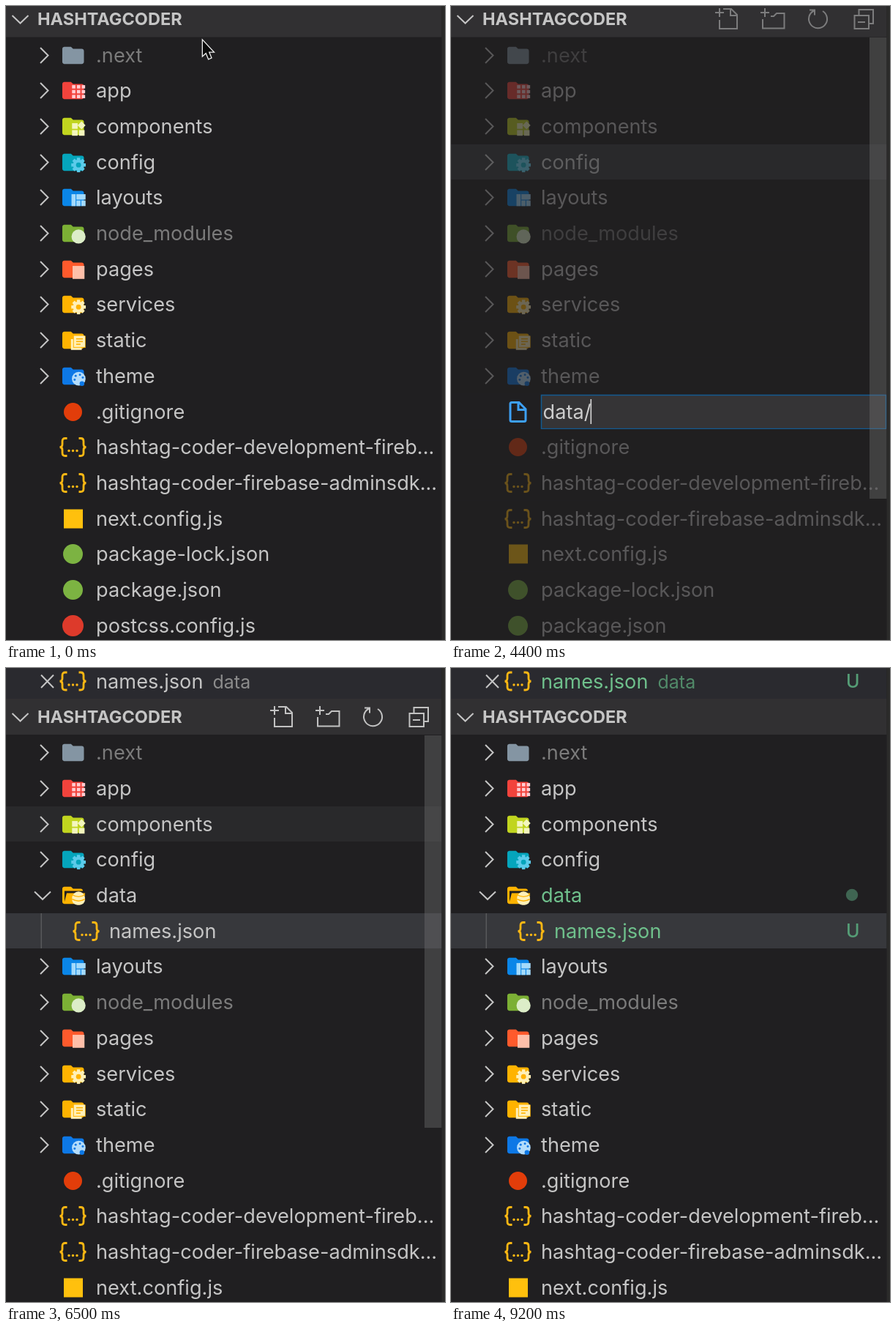
Recreate the animation shown at these times as an HTML page with a canvas. Size 600x866 px, loop 9300 ms.

```html
<!DOCTYPE html>
<html lang="en">
<head>
<meta charset="utf-8">
<title>File explorer</title>
<style>
  html, body { margin: 0; width: 100%; height: 100%; overflow: hidden; background: #201f21; }
  canvas { display: block; }
</style>
</head>
<body>
<canvas id="stage" width="600" height="866"></canvas>
<script>
const ctx = document.getElementById('stage').getContext('2d');
const LOOP = 9300, ROW = 48.7, SIDE = 595.5;
const ICONS_ON = 1100, EDIT = 1200, ENTER = 6100, CREATED = 6500, TRACKED = 7000, LEAVE = 8350;
const BACK = '#201f21', HOVER = '#29292b';
const TEXT = '#c5c5c5', MUTED = '#7b7b7b', GREEN = '#6fc08c', AMBER = '#ffb300';

const folder = (name, color, badge, tint, textColor) => ({ name, color, badge, tint, textColor, folder: true });
const file = (name, icon) => ({ name, icon });
const FOLDERS = [
  folder('.next', '#8495a3', null, null, MUTED),
  folder('app', '#f2433c', 'grid', '#ffcdd2'),
  folder('components', '#c1d51f', 'blocks', '#f3f6bd'),
  folder('config', '#05a5bc', 'gear', '#5ccbea'),
  folder('layouts', '#0a86e8', 'layout', '#a3dafb'),
  folder('node_modules', '#7cb035', 'disc', '#dcedc8', MUTED),
  folder('pages', '#ff5a2c', 'square', '#ffbfa9'),
  folder('services', AMBER, 'gear', '#fff0b8'),
  folder('static', AMBER, 'sheets', '#fff0b8'),
  folder('theme', '#0d78e6', 'palette', '#b3dcfb')
];
const FILES = [
  file('.gitignore', 'git'),
  file('hashtag-coder-development-fireb...', 'json'),
  file('hashtag-coder-firebase-adminsdk...', 'json'),
  file('next.config.js', 'js'),
  file('package-lock.json', 'node'),
  file('package.json', 'node'),
  file('postcss.config.js', 'postcss')
];
const DATA = { name: 'data', color: AMBER, badge: 'database', tint: '#fff0b8', folder: true, open: true };
const NAMES = { name: 'names.json', icon: 'json', nested: true };
const INPUT = { input: true };
const LISTS = {
  idle: [...FOLDERS, ...FILES],
  edit: [...FOLDERS, INPUT, ...FILES],
  done: [...FOLDERS.slice(0, 4), DATA, NAMES, ...FOLDERS.slice(4), ...FILES]
};

const FOLDER = new Path2D('M10 4H4c-1.1 0-2 .9-2 2v12c0 1.1.9 2 2 2h16c1.1 0 2-.9 2-2V8c0-1.1-.9-2-2-2h-8z');
const OPEN_FOLDER = new Path2D('M19 20H4c-1.1 0-2-.9-2-2V6c0-1.1.9-2 2-2h6l2 2h7c1.1 0 2 .9 2 2H4v10l2.1-8h17l-2.3 8.5c-.2.9-1 1.5-1.8 1.5z');
const BRACES = new Path2D('M9.5-12H7Q3-12 3-8V-4Q3 0-.5 0Q3 0 3 4V8Q3 12 7 12H9.5M25.5-12H28Q32-12 32-8V-4Q32 0 35.5 0Q32 0 32 4V8Q32 12 28 12H25.5');
const NEW_FILE = new Path2D('M16-13H9Q7-13 7-11V11Q7 13 9 13H26Q28 13 28 11V-4L19-13H16M18-12V-3H27');
const ARROW = new Path2D('M0 0V20L4.5 16L8 24.5L11.2 23L7.8 15H14Z');
const HAND = new Path2D('M-3 2Q-2-1 1 1L4 9Q6 7 8 10Q10 8 11 11Q14 10 14 14Q14 19 11.5 22V25.5H0V22Q-3 19-7.5 14Q-8 11-5 11.5L-.5 14Z');
const TOOLS = new Path2D(
  'M372-14H383L391-6V13H367V1M382-14V-5H391M361-9H373M367-15V-3' +
  'M437-4H441L445-8H455.5V12.5H426V0M423-9H435M429-15V-3' +
  'M496-11.5A12.5 12.5 0 1 0 508-11M490-12.5H497V-5.5' +
  'M551.5-5H571V13H551.5ZM557.5-5V-13H577V6H571M556 4H566');

function fill(path, color) { ctx.fillStyle = color; ctx.fill(path); }
function stroke(path, color, width) { ctx.strokeStyle = color; ctx.lineWidth = width; ctx.stroke(path); }
function rect(x, y, w, h, color) { ctx.fillStyle = color; ctx.fillRect(x, y, w, h); }
function disc(x, y, r, color) {
  ctx.fillStyle = color;
  ctx.beginPath();
  ctx.arc(x, y, r, 0, 7);
  ctx.fill();
}
function label(text, x, y, color, size = 27.2, weight = 400) {
  ctx.font = `${weight} ${size}px Inter, sans-serif`;
  ctx.fillStyle = color;
  ctx.fillText(text, x, y);
}
function at(x, y, draw) {
  ctx.save();
  ctx.translate(x, y);
  draw();
  ctx.restore();
}
function chevron(x, y, open) {
  stroke(new Path2D(open ? `M${x - 11} ${y - 5}l11 10.5 11-10.5` : `M${x - 5} ${y - 10.5}l10.5 10.5-10.5 10.5`), TEXT, 2);
}

// Folder badges use the 24-unit grid of the folder shape.
const BADGES = {
  grid(c) {
    for (let i = 0; i < 9; i++) rect(11 + i % 3 * 4.5, 7 + Math.floor(i / 3) * 4.5, 3.1, 3.1, c);
  },
  blocks(c) {
    rect(11, 9, 5.2, 5.2, c);
    rect(11, 15.4, 5.2, 5.2, c);
    rect(17.4, 15.4, 5.2, 5.2, c);
    at(19.8, 11, () => { ctx.rotate(Math.PI / 4); rect(-2.6, -2.6, 5.2, 5.2, c); });
  },
  gear(c, hole) {
    at(17, 14.5, () => {
      for (let i = 0; i < 8; i++) {
        rect(-1.5, -6.7, 3, 4, c);
        ctx.rotate(Math.PI / 4);
      }
      disc(0, 0, 5.1, c);
      disc(0, 0, 2.3, hole);
    });
  },
  layout(c) {
    rect(10.5, 9, 3.8, 11, c);
    rect(15, 9, 8.5, 5, c);
    rect(15, 14.8, 3.8, 5.2, c);
    rect(19.6, 14.8, 3.9, 5.2, c);
  },
  disc(c) { disc(17, 15, 6.5, c); },
  square(c) { rect(11.5, 9, 11, 12, c); },
  sheets(c, gap) {
    rect(10, 11, 10, 10, c);
    rect(12, 8, 11.5, 11, gap);
    rect(12.7, 8, 10.3, 10.3, c);
    for (let i = 0; i < 3; i++) rect(14.8, 10.2 + i * 2.5, i < 2 ? 6.2 : 4, 1.1, gap);
  },
  palette(c, hole) {
    disc(17.2, 14.5, 6.3, c);
    for (const a of [2.9, 3.9, 5, 6]) disc(17.2 + 3.9 * Math.cos(a), 14.5 + 3.9 * Math.sin(a), 1, hole);
    disc(20.2, 19, 2.2, hole);
  },
  database(c, gap) {
    ctx.fillStyle = c;
    ctx.beginPath();
    ctx.roundRect(11, 8.5, 12, 12.5, [6, 6, 5, 5]);
    ctx.fill();
    stroke(new Path2D('M11 11.5Q17 15 23 11.5M11 15.5Q17 19 23 15.5'), gap, 0.9);
  }
};
function folderIcon(item, y) {
  at(74, y - 17.75, () => {
    ctx.scale(1.478, 1.478);
    fill(item.open ? OPEN_FOLDER : FOLDER, item.color);
    if (item.badge) BADGES[item.badge](item.tint, item.color);
  });
}

const FILE_ICONS = {
  json() {
    stroke(BRACES, '#fbb713', 2.8);
    for (const x of [12, 17.5, 23]) disc(x, 5, 1.7, '#fbb713');
  },
  js() { rect(5, -13, 26, 26, '#ffc00d'); },
  git() { disc(17.5, 0, 12.5, '#e23d0a'); },
  node() { disc(17.5, 0, 13.5, '#7cb342'); },
  postcss() { disc(17.5, 0, 14.5, '#dd3a2b'); }
};

// Typing: the directory first, a pause, then the file name.
const FILENAME = 'data/names.json';
const keyTime = i => i < 5 ? 3200 + i * 240 : 4750 + (i - 5) * 110;

function drawInput(t, y) {
  at(74, y + 0.5, () => stroke(NEW_FILE, '#3da0f5', 3));
  rect(123, y - 23, 472, 47, '#353436');
  ctx.strokeStyle = '#135a90';
  ctx.lineWidth = 1.5;
  ctx.strokeRect(123.5, y - 22.5, 471, 46);
  let typed = 0;
  while (typed < FILENAME.length && keyTime(typed) <= t) typed++;
  const text = FILENAME.slice(0, typed);
  label(text, 125.5, y + 10, '#cdcdcd');
  const lastKey = typed ? keyTime(typed - 1) : 1250;
  if ((t - lastKey + 1000) % 1000 < 500) {
    rect(124.5 + ctx.measureText(text).width, y - 17, 1.6, 34, '#d6d6d6');
  }
}

function drawRow(item, y, t) {
  const tracked = t >= TRACKED;
  const dx = item.nested ? 18 : 0, iconY = y + 0.5;
  let color = item.textColor || TEXT;
  if (tracked && (item === DATA || item === NAMES)) color = GREEN;
  if (item.folder) {
    chevron(item.open ? 50 : 52, iconY, item.open);
    folderIcon(item, iconY);
  } else {
    at(74 + dx, iconY, FILE_ICONS[item.icon]);
  }
  label(item.name, 123 + dx, y + 10, color);
  if (item.nested) rect(47.5, y - 24, 1.5, 48, '#58585b');
  if (tracked && item === DATA) disc(548, y, 8.2, '#3f6552');
  if (tracked && item === NAMES) label('U', 540, y + 9, '#559d76', 25, 500);
}

function drawOpenEditor(t) {
  const tracked = t >= TRACKED;
  rect(0, 0, SIDE, 42, '#2a2a2f');
  stroke(new Path2D('M48 9.5L65 27M65 9.5L48 27'), TEXT, 2);
  at(74, 18, FILE_ICONS.json);
  label('names.json', 123, 28, tracked ? GREEN : TEXT);
  label('data', 282.5, 28, tracked ? '#518a69' : '#8c8c8c', 25);
  if (tracked) label('U', 540, 27, '#559d76', 25, 500);
}

const clamp = v => Math.min(1, Math.max(0, v));
const ease = v => v * v * (3 - 2 * v);
function move(t, from, to, start, end) {
  const k = ease(clamp((t - start) / (end - start)));
  return from.map((v, i) => v + (to[i] - v) * k);
}
function pointer(t) {
  if (t < 1650) return move(t, [269, 47.5], [355, 20], 100, 950);
  if (t < 7750) return move(t, [355, 20], [337, 216], 1650, 2280);
  return move(t, [337, 216], [640, 250], 7750, 8400);
}
function drawPointer(t, [x, y]) {
  if (t > 3200 && t < 7800 || t > 8400) return;
  at(x, y, () => {
    if (t > 1650 && y > 43) {
      stroke(HAND, '#111', 3);
      fill(HAND, '#fff');
      for (const lx of [3, 6.5, 10]) rect(lx, 14, 1.3, 7, '#222');
    } else {
      stroke(ARROW, '#eee', 2.6);
      fill(ARROW, '#0a0a0a');
    }
  });
}

function draw(t) {
  const editing = t >= EDIT && t < ENTER;
  const done = t >= CREATED;
  const rows = LISTS[editing ? 'edit' : done ? 'done' : 'idle'];
  const shift = done ? 49 : 0;
  const top = 43 + shift;
  const pos = pointer(t);
  const hovering = t > 1650 && t < LEAVE && pos[1] > top;
  const hovered = hovering ? Math.floor((pos[1] - top) / ROW) : -1;

  rect(0, 0, 600, 866, BACK);
  rows.forEach((item, i) => {
    const y = Math.floor(67 + (i + (done ? 1 : 0)) * ROW);
    const back = item === NAMES ? '#37383c' : i === hovered ? HOVER : BACK;
    rect(0, y - 24, SIDE, 48, back);
    if (item.input) return drawInput(t, y);
    drawRow(item, y, t);
    if (editing) {
      ctx.globalAlpha = 0.66;
      rect(0, y - 24, SIDE, 48, back);
      ctx.globalAlpha = 1;
    }
  });

  const fadeIn = clamp((t - 1150) / 400), fadeOut = clamp((t - LEAVE) / 500);
  const barEnd = editing ? 673 : done ? 628 : 704;
  rect(572, top, 23.5, barEnd - top, `rgba(121,121,121,${0.37 * fadeIn * (1 - fadeOut)})`);

  rect(0, shift ? 42 : 0, SIDE, shift ? 49 : 42.5, '#313032');
  chevron(19.5, 18 + shift, true);
  label('HASHTAGCODER', 43, 26 + shift, TEXT, 23.5, 700);
  if (t >= ICONS_ON && t < LEAVE) {
    at(0, 18 + shift, () => stroke(TOOLS, editing ? '#7c7c7d' : '#c2c2c2', 2));
  }
  if (done) drawOpenEditor(t);
  rect(SIDE, 0, 600 - SIDE, 866, '#2b2b2a');
  if (t >= ENTER && !done) {
    rect(0, 43, SIDE, 1.5, '#0f5484');
    rect(594, 43, 1.5, 823, '#0f5484');
  }
  drawPointer(t, pos);
}

function frame(now) {
  draw(now % LOOP);
  requestAnimationFrame(frame);
}
requestAnimationFrame(frame);
</script>
</body>
</html>
```
